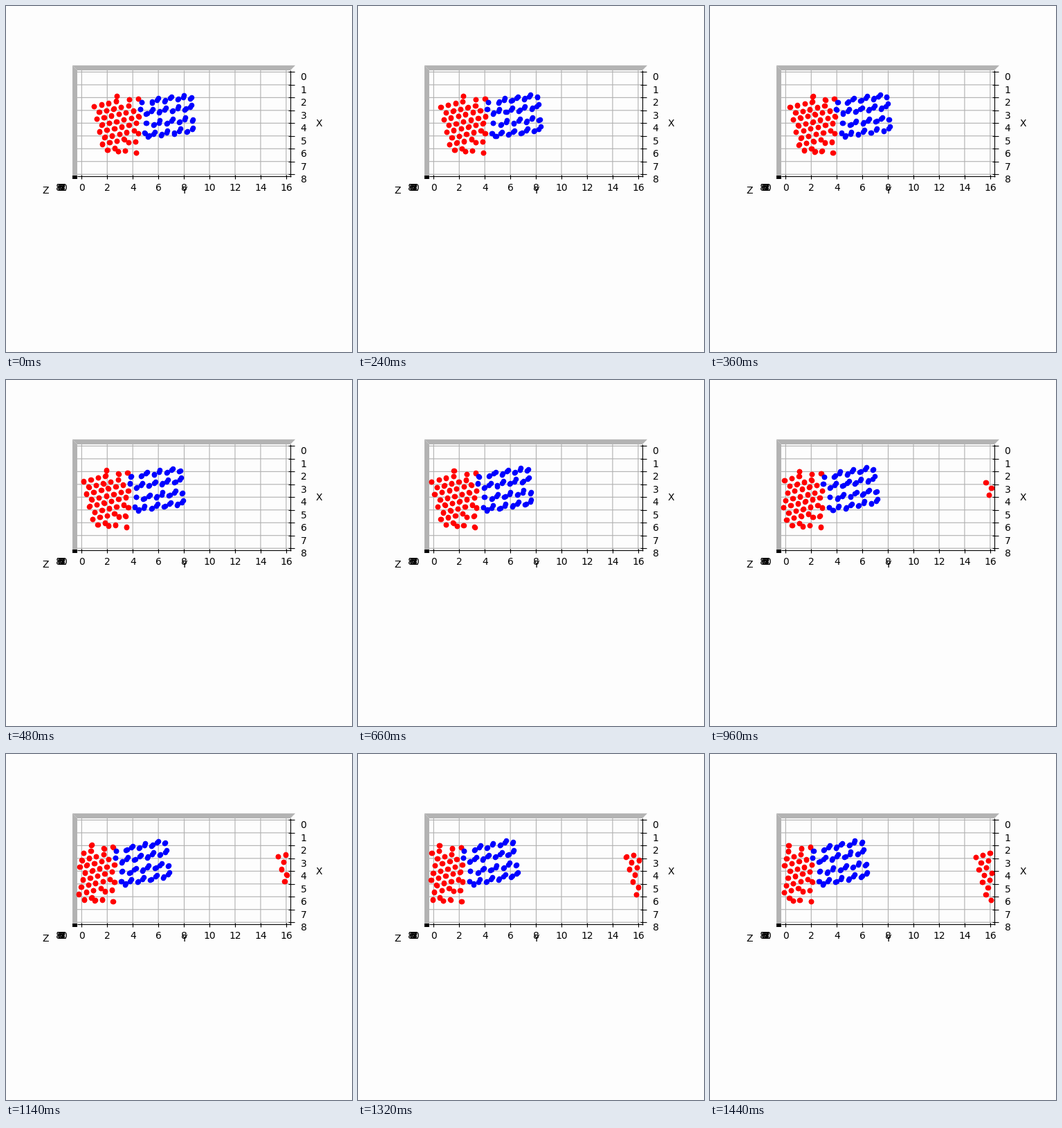
These frames come from a looping animation (500x500 px, 1500 ms). A matplotlib script:

```python
import matplotlib.pyplot as plt
import numpy as np
from matplotlib.animation import FuncAnimation

FRAMES, INTERVAL = 25, 60
BACK, GRID, WALL = "#fdfdfd", "#b0b0b0", "#b3b3b3"
LEFT, RIGHT, TOP, BOTTOM = 103, 411, 93, 246   # floor of the box, in pixels
MID_X, MID_Y, UNIT = 257.1, 169.3, 18.47       # centre and scale of the floor
WRAP_AT, PERIOD = 105, 302

fig = plt.figure(figsize=(5, 5), dpi=100, facecolor=BACK)
ax = fig.add_axes([0, 0, 1, 1])
ax.set(xlim=(0, 500), ylim=(500, 0))
ax.axis("off")


def line(x0, y0, x1, y1, color="black", z=2, snap=True):
    ax.plot([x0, x1], [y0, y1], color=color, lw=0.8, zorder=z, snap=snap,
            solid_capstyle="butt")


def label(x, y, text):
    """Text centred on (x, y)."""
    ax.text(x, y + 5, text, ha="center", va="baseline", fontsize=10,
            family="DejaVu Sans", zorder=6)


def draw_box():
    # side walls, seen almost edge-on from above
    ax.fill([96, 418, RIGHT, LEFT], [85.8, 85.8, TOP, TOP], color=WALL, lw=0)
    ax.fill([96, LEFT, LEFT, 96], [85.8, TOP, BOTTOM, BOTTOM],
            color=WALL, lw=0)

    for i in range(9):
        x, y = MID_X + 2 * UNIT * (i - 4), MID_Y + UNIT * (i - 4)
        line(x, TOP, x, BOTTOM, GRID, z=1, snap=(i == 4))
        line(LEFT, y, RIGHT, y, GRID, z=1, snap=False)
        line(x, 244, x, 250)
        line(408, y, 417, y)
        label(x + 0.1, 262, str(2 * i))
        label(430, 102.4 + UNIT * i, str(i))
        label(84 - 0.9 * i, 262, str(i))   # depth labels pile up

    line(LEFT, BOTTOM, RIGHT + 1, BOTTOM)
    line(RIGHT, TOP, RIGHT, BOTTOM + 1)
    ax.fill([96, LEFT, LEFT, 96], [244.5, 244.5, 249.5, 249.5],
            color="black", lw=0, zorder=3)
    label(452, 169, "X")
    label(257, 266, "Y")
    label(57, 265.8, "Z")


def red_crystal():
    """Hexagonal patch built from its left edge, plus loose edge atoms."""
    pts = []
    for r, n in enumerate((4, 5, 6, 6, 6, 5, 4, 2)):
        pair, odd = divmod(r, 2)
        x, y = 127 + 4 * pair + 7.5 * odd, 145 + 18.2 * pair + 8.3 * odd
        pts += [(x + 10.6 * k, y - 2.4 * k) for k in range(n)]
    pts += [(x + 10 * k, y - k) for x, y in ((177, 197), (162, 210))
            for k in range(2)]
    pts += [(160, 130), (178, 135), (191, 134), (191, 184), (188, 212)]
    return np.array(pts, float)


def blue_crystal():
    """Four zigzag rows and the atoms of the left edge, with layer gaps."""
    pts, gaps = [], []
    for r in range(4):
        x, y = 211 + 1.3 * r - 9 * (r % 2), 139 + 16.3 * r
        for j in range(7 + r % 2):
            pair, odd = divmod(j, 2)
            pts.append((x + 18.6 * pair + 8 * odd,
                        y - 2.1 * pair - 4.6 * odd))
            gaps.append((0.9, -1.4) if odd else (0.6, -0.7))
    edge = [(196, 139), (194, 149), (202.5, 169), (200.5, 183.5)]
    return np.array(pts + edge), np.array(gaps + [(0, 0)] * len(edge))


def drift(p, speed, turn, pivot):
    """Shift over one loop: slide left while turning slowly."""
    x, y = p.T
    return np.column_stack([turn * (y - 165) - speed,
                            0.7 - turn * (x - pivot)])


def layers(start, shift, gap, phase, t):
    """Both layers of every column at loop position t in 0..1."""
    mid = start + shift * t
    spread = gap + 0.3 * np.sin(4 * np.pi * t + phase)
    pts = np.vstack([mid - spread, mid + spread])
    pts[:, 0] += np.where(pts[:, 0] < WRAP_AT, PERIOD, 0)
    return pts


rng = np.random.default_rng(4)
red = red_crystal()
red_shift = drift(red, 44.4, 0.05, 193)
red_phase = rng.uniform(0, 2 * np.pi, red.shape)
blue, blue_gap = blue_crystal()
blue_shift = drift(blue, 44.4, 0.085, 200)
blue_phase = rng.uniform(0, 2 * np.pi, blue.shape)

draw_box()
red_dots = ax.scatter([], [], s=20, color="red", linewidths=1, zorder=4)
blue_dots = ax.scatter([], [], s=20, color="blue", linewidths=1, zorder=5)


def update(frame):
    t = frame / (FRAMES - 1)
    red_dots.set_offsets(layers(red, red_shift, 0.1, red_phase, t))
    blue_dots.set_offsets(layers(blue, blue_shift, blue_gap, blue_phase, t))
    return red_dots, blue_dots


anim = FuncAnimation(fig, update, frames=FRAMES, interval=INTERVAL,
                     repeat=True, repeat_delay=0)
plt.show()
```
